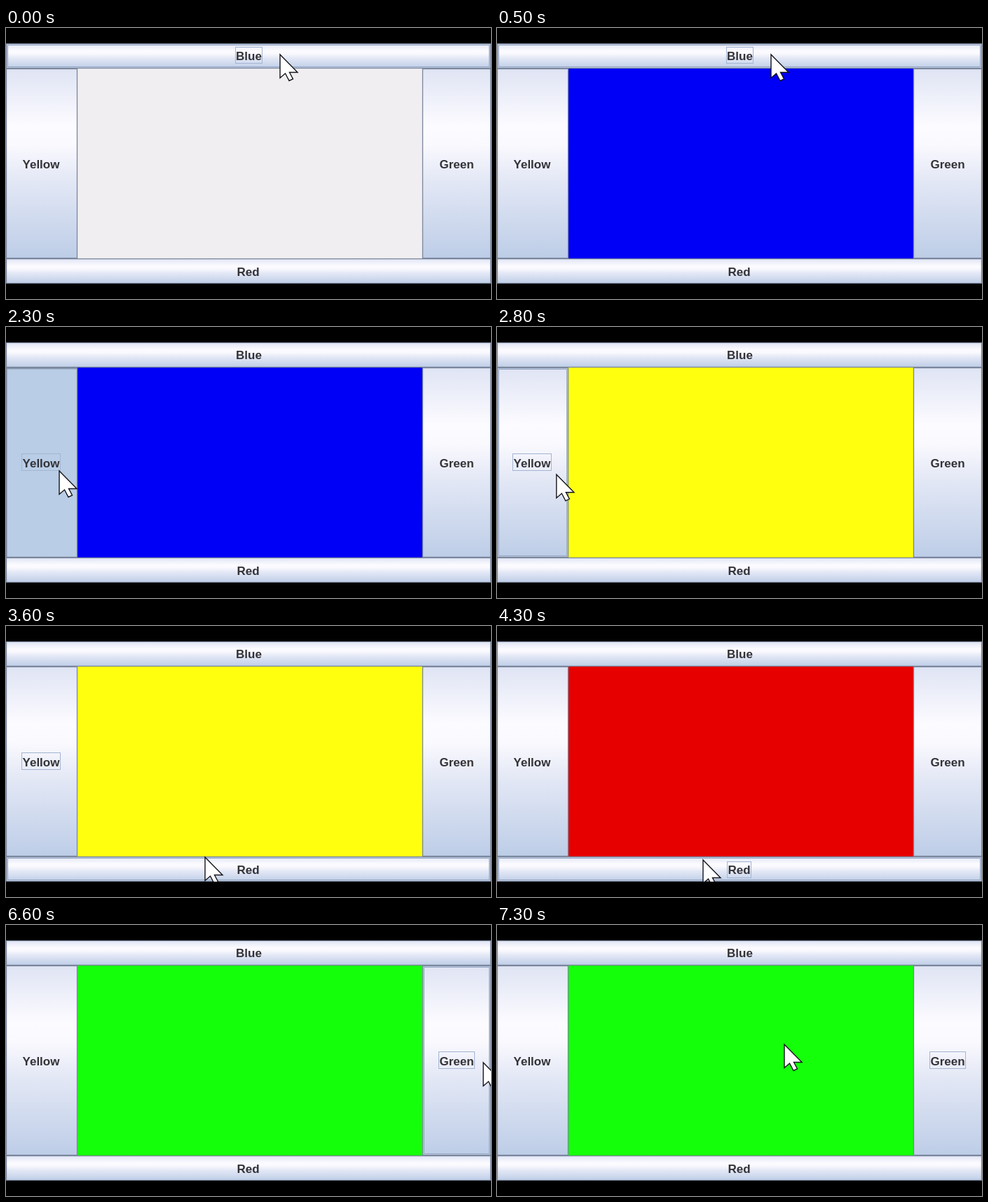
Recreate the animation shown at these times as an HTML page with a canvas. Size 692 by 388 pixels, loop 7800 ms.

```html
<!DOCTYPE html>
<html lang="en">
<head>
<meta charset="utf-8">
<title>Colour buttons</title>
<style>
  html, body { margin: 0; width: 100%; height: 100%; overflow: hidden; background: #000; }
  canvas { display: block; width: 692px; height: 388px; }
</style>
</head>
<body>
<canvas id="stage" width="692" height="388"></canvas>
<script>
const ctx = document.getElementById('stage').getContext('2d');
const LOOP = 7800, TICK = 100;
const EDGE = '#7a869c', PRESSED = '#b9cde6';

const buttons = [
  { name: 'Blue', x: 0, y: 22, w: 692, h: 36, tx: 346.5, ty: 46, focus: [327, 27, 39, 24] },
  { name: 'Yellow', x: 0, y: 58, w: 102, h: 272, tx: 50, ty: 201, focus: [22, 181, 56, 25] },
  { name: 'Red', x: 0, y: 330, w: 692, h: 36, tx: 345.5, ty: 355, focus: [328, 337, 35, 24] },
  { name: 'Green', x: 594, y: 58, w: 98, h: 272, tx: 643, ty: 201, focus: [617, 181, 52, 25] }
];

// Each click: button pressed from `down`, panel recoloured at `up`.
const clicks = [
  { name: 'Blue', down: 100, up: 300, color: '#0000f6' },
  { name: 'Yellow', down: 2200, up: 2400, color: '#ffff0e' },
  { name: 'Red', down: 4000, up: 4200, color: '#e60000' },
  { name: 'Green', down: 6400, up: 6600, color: '#14ff0a' }
];

// Pointer moves: first step, last step, destination.
const startPos = [391, 38];
const moves = [
  [1500, 1900, 76, 206],
  [2800, 3500, 282, 329],
  [3600, 3600, 284, 331],
  [3700, 3800, 294, 335],
  [5200, 5600, 658, 203],
  [5800, 5900, 681, 197],
  [6900, 7300, 410, 171]
];

const arrow = [[0, 0], [0, 33.5], [7.5, 27], [13, 37.5], [18.5, 35], [13.5, 25.5], [25, 25.5]];

function pointerAt(t) {
  let [x, y] = startPos;
  for (const [from, to, toX, toY] of moves) {
    if (t < from) break;
    const p = Math.min(1, (t - from + TICK) / (to - from + TICK));
    const e = p * p * (3 - 2 * p);
    x += (toX - x) * e;
    y += (toY - y) * e;
  }
  return [x, y];
}

function box(x, y, w, h, color, width = 1) {
  ctx.strokeStyle = color;
  ctx.lineWidth = width;
  ctx.strokeRect(x + 0.5, y + 0.5, w - 1, h - 1);
}

function drawButton(b, hover, pressed, focused) {
  const { x, y, w, h } = b;
  if (pressed) {
    ctx.fillStyle = PRESSED;
  } else {
    const g = ctx.createLinearGradient(0, y, 0, y + h);
    g.addColorStop(0, '#dfe4f4');
    g.addColorStop(0.3, '#fcfbff');
    g.addColorStop(0.4, '#faf9fe');
    g.addColorStop(0.6, '#e2e7f5');
    g.addColorStop(1, '#bdcde7');
    ctx.fillStyle = g;
  }
  ctx.fillRect(x, y, w, h);
  if (pressed) {
    ctx.fillStyle = '#8d9db6';
    ctx.fillRect(x, y + 1, w, 1.5);
    ctx.fillRect(x + 1, y, 0.6, h);
  } else if (hover) {
    box(x + 1, y + 1, w - 2, h - 2, '#c3d1e8');
    box(x + 2, y + 2, w - 4, h - 4, '#98a8c4');
  }
  box(x, y, w, h, EDGE, 1.3);
  if (focused) box(...b.focus, '#a3b5d2');
  ctx.fillStyle = '#333338';
  ctx.fillText(b.name, b.tx, b.ty);
}

function drawPointer(x, y) {
  ctx.beginPath();
  for (const [dx, dy] of arrow) ctx.lineTo(x + dx, y + dy);
  ctx.closePath();
  ctx.fillStyle = '#fff';
  ctx.fill();
  ctx.strokeStyle = '#15151c';
  ctx.lineWidth = 1.4;
  ctx.stroke();
}

function draw(t) {
  const [px, py] = pointerAt(t);
  let panel = '#f0eef1', focus = 'Blue', held = '';
  for (const c of clicks) {
    if (t >= c.down) focus = c.name;
    if (t >= c.down && t < c.up) held = c.name;
    if (t >= c.up) panel = c.color;
  }

  ctx.fillStyle = '#000';
  ctx.fillRect(0, 0, 692, 388);
  ctx.save();
  ctx.beginPath();
  ctx.rect(0, 22, 692, 344);
  ctx.clip();
  ctx.fillStyle = panel;
  ctx.fillRect(101, 57, 494, 274);
  ctx.font = 'bold 17px "Liberation Sans", Arial, sans-serif';
  ctx.textAlign = 'center';
  for (const b of buttons) {
    const over = px >= b.x && px < b.x + b.w && py >= b.y && py < b.y + b.h;
    drawButton(b, over, b.name === held, b.name === focus);
  }
  drawPointer(px, py);
  ctx.restore();
}

function frame() {
  const t = performance.now() % LOOP;
  draw(Math.floor(t / TICK) * TICK);
  requestAnimationFrame(frame);
}
frame();
</script>
</body>
</html>
```
